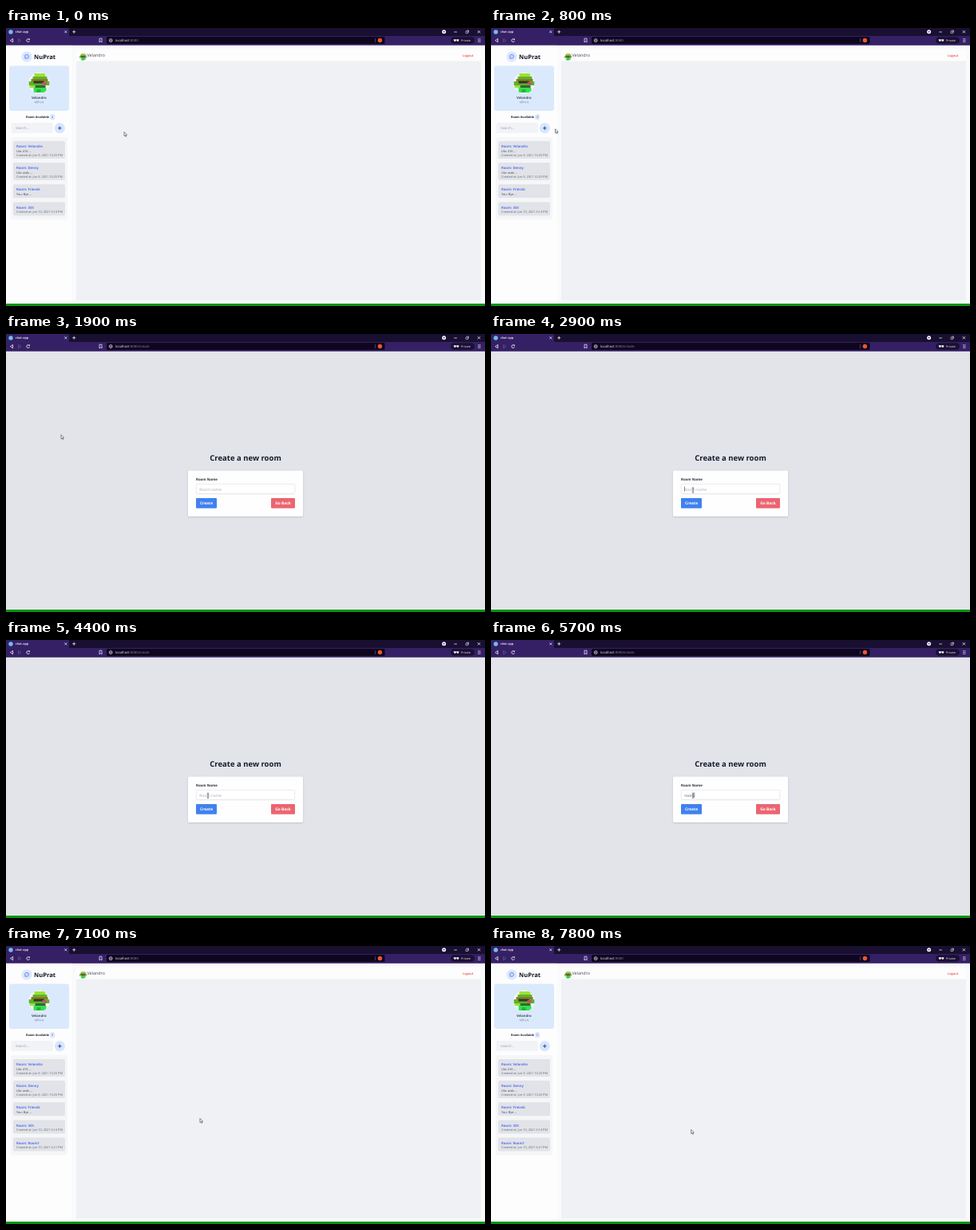
Recreate the animation shown at these times as an HTML page with a canvas. Size 600 by 349 pixels, loop 8000 ms.

```html
<!DOCTYPE html>
<html lang="en">
<head>
<meta charset="utf-8">
<title>chat-app</title>
<style>
html, body { margin: 0; width: 100%; height: 100%; overflow: hidden; background: #f9fafb; }
canvas { display: block; width: 600px; height: 349px; }
</style>
</head>
<body>
<canvas id="stage"></canvas>
<script>
const W = 600, H = 349, LOOP = 8000, STEP = 100;
const canvas = document.getElementById('stage');
const ratio = window.devicePixelRatio || 1;
canvas.width = W * ratio;
canvas.height = H * ratio;
const ctx = canvas.getContext('2d');
const FAMILY = '"Open Sans", "Noto Sans", sans-serif';
const USER = 'Velandro';

// Times of the main events, in ms
const PLUS_CLICK = 1500, URL_CHANGE = 1800, FORM_OPEN = 1900;
const FOCUS = 2900, SUBMIT = 6800, FORM_CLOSE = 7100;
const KEYS = [4800, 5100, 5300, 5500, 5800];
const VALUE = 'room1';

// Pointer stops: time, x, y
const PATH = [
  [200, 148, 130.5], [1000, 68, 126], [1800, 68, 126], [1900, 69, 126.5],
  [2600, 250, 196], [2900, 253, 196], [3100, 253, 195.3], [6100, 253, 195.3],
  [6600, 252.3, 211], [7000, 252.3, 211], [7100, 243, 216.5],
  [7300, 248, 225], [7600, 248, 225], [7800, 250.7, 230.5]
];

const ROOMS = [
  { y: 142, h: 22, name: USER, lines: ['Ula: 416 ...', 'Created at: Jun 9, 2021 10:25 PM'] },
  { y: 169, h: 22, name: 'Denny', lines: ['Ula: asds ...', 'Created at: Jun 9, 2021 10:25 PM'] },
  { y: 196.3, h: 17, name: 'Friends', lines: ['You: Bye ...'] },
  { y: 218.5, h: 17, name: '333', lines: ['Created at: Jun 10, 2021 6:14 PM'] },
  { y: 240.5, h: 17, name: 'Room1', lines: ['Created at: Jun 10, 2021 6:21 PM'] }
];

function rect(x, y, w, h, color) {
  ctx.fillStyle = color;
  ctx.fillRect(x, y, w, h);
}

function box(x, y, w, h, r, fill, stroke, line = 0.6) {
  ctx.beginPath();
  ctx.roundRect(x, y, w, h, r);
  if (fill) { ctx.fillStyle = fill; ctx.fill(); }
  if (stroke) { ctx.strokeStyle = stroke; ctx.lineWidth = line; ctx.stroke(); }
}

function disc(x, y, r, color) {
  ctx.fillStyle = color;
  ctx.beginPath();
  ctx.arc(x, y, r, 0, Math.PI * 2);
  ctx.fill();
}

function ring(x, y, r, color, from = 0, to = Math.PI * 2) {
  ctx.strokeStyle = color;
  ctx.lineWidth = 0.8;
  ctx.beginPath();
  ctx.arc(x, y, r, from, to);
  ctx.stroke();
}

function path(points, { stroke, fill, width = 0.8, close = false }) {
  ctx.beginPath();
  points.forEach(([x, y], i) => i ? ctx.lineTo(x, y) : ctx.moveTo(x, y));
  if (close) ctx.closePath();
  if (fill) { ctx.fillStyle = fill; ctx.fill(); }
  if (stroke) { ctx.strokeStyle = stroke; ctx.lineWidth = width; ctx.stroke(); }
}

function cross(x, y, r, color) {
  path([[x - r, y - r], [x + r, y + r]], { stroke: color });
  path([[x - r, y + r], [x + r, y - r]], { stroke: color });
}

function plus(x, y, r, color, width) {
  path([[x - r, y], [x + r, y]], { stroke: color, width });
  path([[x, y - r], [x, y + r]], { stroke: color, width });
}

function text(str, x, y, size, color, weight = 400, align = 'left') {
  ctx.font = `${weight} ${size}px ${FAMILY}`;
  ctx.fillStyle = color;
  ctx.textAlign = align;
  ctx.fillText(str, x, y);
  return ctx.measureText(str).width;
}

function drawBrowser(onCreate) {
  rect(0, 0, W, 10, '#190f31');
  rect(0, 0, 79, 10, '#352065');
  rect(0, 10, W, 11.6, '#352065');

  disc(6, 5, 2.7, '#72bdec');
  text('chat-app', 11.7, 6.4, 3.9, '#f4f1fb', 600);
  cross(74.8, 4.8, 1.4, '#e8e4f4');
  plus(85.2, 4.8, 2, '#f4f1fb', 0.8);

  disc(548.6, 4.8, 2.5, '#f4f1fb');
  path([[547.4, 4.2], [549.8, 4.2], [548.6, 5.8]], { fill: '#190f31', close: true });
  path([[561.3, 5], [564.9, 5]], { stroke: '#e8e4f4' });
  box(576, 4, 2.6, 2.6, 0, null, '#e8e4f4');
  path([[577, 3.1], [579.5, 3.1], [579.5, 5.6]], { stroke: '#e8e4f4', width: 0.6 });
  cross(592.4, 4.8, 1.6, '#f4f1fb');

  path([[8.6, 13.4], [5.4, 15.6], [8.6, 17.8]], { stroke: '#f4f1fb', close: true });
  path([[15.6, 13.4], [18.8, 15.6], [15.6, 17.8]], { stroke: '#66558e', close: true });
  ring(27.7, 15.6, 1.9, '#f4f1fb', 0.3, 5.5);
  path([[29.8, 13.1], [29.8, 15], [27.9, 15]], { fill: '#f4f1fb', close: true });
  path([[117, 13.2], [120, 13.2], [120, 18], [118.5, 16.6], [117, 18]], { stroke: '#e8e4f4', close: true });

  box(126, 11, 348.5, 9, 1.5, '#0e061f');
  ring(131.2, 15.6, 2, '#c9c4d6');
  path([[129.2, 15.6], [133.2, 15.6]], { stroke: '#c9c4d6', width: 0.5 });
  path([[131.2, 13.6], [131.2, 17.6]], { stroke: '#c9c4d6', width: 0.5 });
  const w = text('localhost', 137, 17.1, 4.25, '#f4f1fb');
  text(':8080' + (onCreate ? '/create' : ''), 137 + w, 17.1, 4.25, '#8d8799');
  rect(462, 13, 0.6, 5, '#6b6478');
  disc(468.4, 15.5, 2.7, '#f2562e');

  box(557, 11.2, 30, 8.6, 4.3, '#1b1033');
  path([[560.5, 14.8], [567.5, 14.8]], { stroke: '#f4f1fb', width: 0.7 });
  disc(562.4, 15.6, 1.3, '#f4f1fb');
  disc(565.8, 15.6, 1.3, '#f4f1fb');
  text('Private', 570, 17, 3.7, '#f4f1fb');
  for (const y of [13.8, 15.6, 17.4]) path([[591, y], [594.6, y]], { stroke: '#d9d3ea', width: 0.7 });
}

function drawAvatar(x, y, k) {
  ctx.save();
  ctx.translate(x, y);
  ctx.scale(k, k);
  ctx.beginPath();
  ctx.arc(0, 0, 13.2, 0, Math.PI * 2);
  ctx.clip();
  rect(-14, -14, 28, 28, '#f7f8f6');
  rect(-6, -12, 14, 4, '#9be431');
  rect(-8, -8, 18, 3, '#62b32b');
  rect(-10, -5, 21, 4, '#8a7a2c');
  rect(-13, -2, 26, 5, '#63ad2c');
  rect(-7, -2.5, 13, 3, '#2a3a1c');
  rect(4, -1, 5, 3, '#d3447a');
  rect(-12, 3, 7, 3, '#8ee635');
  rect(-5, 3, 13, 3, '#2d6b31');
  rect(-7, 6, 16, 6, '#36df4f');
  rect(-3, 8, 5, 4, '#20b53f');
  ctx.restore();
}

function drawRoom({ y, h, name, lines }) {
  box(9, y, 65, h, 2, '#e1e3e8');
  text('Room: ' + name, 13, y + 8, 4.3, '#3a5cf0', 600);
  lines.forEach((line, i) => {
    text(line, 13, y + 13.5 + i * 5.2, 3.85, line.startsWith('Created') ? '#5f646e' : '#3c424d');
  });
}

function drawChat(focused, rooms) {
  rect(0, 21.6, W, 325, '#f9fafb');
  rect(0, 21.6, 82.5, 325, '#fdfdfe');

  disc(26, 36, 6.6, '#dbe8fd');
  ring(26, 35.8, 2.5, '#5a72dc');
  path([[24, 37.2], [23.4, 38.6], [25.2, 38.2]], { fill: '#5a72dc', close: true });
  for (const dx of [-1, 0, 1]) disc(26 + dx, 35.8, 0.35, '#5a72dc');
  text('NuPrat', 35, 39.2, 7.6, '#141a28', 700);

  box(4, 47.5, 75, 56.5, 3, '#dbe9fd');
  drawAvatar(41.5, 69, 1);
  text(USER, 41.3, 89, 4.3, '#272d3b', 600, 'center');
  text('q@q.q', 41.3, 94.4, 3.9, '#7d8797', 400, 'center');

  text('Room Available', 25, 113, 3.76, '#20252f', 700);
  box(55.2, 108, 6, 7.4, 2.5, '#dbe8fd');
  text(String(rooms), 58.2, 113, 3.8, '#56617a', 400, 'center');

  box(6.5, 119, 52.5, 13, 2, '#f2f3f6');
  text('Search...', 12, 127.3, 4.4, '#969ca8');
  disc(67.3, 125.7, 6.6, '#d8e6fd');
  if (focused) box(61, 119.4, 12.8, 12.6, 1, '#dbe8fd', '#15171c', 1);
  plus(67.3, 125.7, 2.3, '#2c4a9c', 1);

  const last = ROOMS[rooms - 1];
  box(6, 137, 71, last.y + last.h + 5 - 137, 3, '#f5f6f8');
  ROOMS.slice(0, rooms).forEach(drawRoom);

  rect(88, 27, 507, 14.5, '#fdfdfe');
  rect(88, 41.5, 507, 300.5, '#eff1f4');
  drawAvatar(96.5, 36.2, 0.36);
  text(USER, 101.5, 36.1, 5.4, '#454a54');
  text('Logout', 572, 36.4, 3.95, '#ee4343', 600);
}

function drawForm(t, pointer) {
  rect(0, 21.6, W, 325, '#e2e4e9');
  text('Create a new room', 300, 159.3, 9.5, '#151a2b', 700, 'center');

  ctx.save();
  ctx.shadowColor = 'rgba(0,0,0,0.16)';
  ctx.shadowBlur = 2.5 * ratio;
  ctx.shadowOffsetY = 0.8 * ratio;
  box(228, 171.5, 144, 57.5, 1.5, '#fefefe');
  ctx.restore();

  text('Room Name', 238, 184.2, 4.4, '#2b303b', 700);
  box(238.3, 188.3, 123.5, 12.2, 1.2, '#ffffff', '#d9dbe0');
  rect(239, 200.7, 122, 0.5, '#e6e7ea');

  const typed = VALUE.slice(0, KEYS.filter(k => t >= k).length);
  const w = text(typed || 'Room name', 242.2, 196.5, 4.9, typed ? '#565b66' : '#a6aab3');
  const lastKey = KEYS.reduce((last, k) => t >= k ? k : last, FOCUS);
  if (t >= FOCUS && t < SUBMIT && (t - lastKey) % 1000 < 500) {
    rect(242.2 + (typed ? w : 0), 191.5, 0.6, 6.2, '#3c414b');
  }

  box(238, 206, 26, 12.7, 1, overCreate(pointer) ? '#2450cf' : '#4081ee');
  text('Create', 251, 214.1, 4.9, '#ffffff', 700, 'center');
  box(332, 206, 30, 12.7, 1, '#eb6571');
  text('Go Back', 347, 214.1, 4.9, '#ffffff', 700, 'center');
}

function inside([x, y], left, top, right, bottom) {
  return x >= left && x <= right && y >= top && y <= bottom;
}

function overCreate(p) {
  return inside(p, 238, 206, 264, 218.7);
}

function pointerAt(t) {
  if (t <= PATH[0][0]) return PATH[0].slice(1);
  for (let i = 1; i < PATH.length; i++) {
    const [t0, x0, y0] = PATH[i - 1], [t1, x1, y1] = PATH[i];
    if (t <= t1) {
      const u = (t - t0) / (t1 - t0), e = u * u * (3 - 2 * u);
      return [x0 + (x1 - x0) * e, y0 + (y1 - y0) * e];
    }
  }
  return PATH[PATH.length - 1].slice(1);
}

function drawPointer(p, onForm) {
  const [x, y] = p;
  const hand = onForm ? overCreate(p) : inside(p, 60.7, 119, 74, 132);
  ctx.save();
  ctx.translate(x, y);
  if (hand) {
    path([[0, 0], [0.9, 0], [1.1, 2.2], [3.6, 2.8], [3.6, 5], [2.8, 6.7], [0, 6.7],
      [-1.8, 4.2], [-1.2, 3.5], [-0.1, 4]], { fill: '#ffffff', stroke: '#2a2d35', width: 0.5, close: true });
  } else if (onForm && inside(p, 238, 188, 362, 200.6)) {
    path([[0, -2.8], [0, 2.8]], { stroke: '#2a2d35', width: 0.7 });
    path([[-1.2, -3], [1.2, -3]], { stroke: '#2a2d35', width: 0.6 });
    path([[-1.2, 3], [1.2, 3]], { stroke: '#2a2d35', width: 0.6 });
  } else {
    path([[0, 0], [0, 5.1], [1.2, 4.1], [2, 5.9], [2.9, 5.5], [2.1, 3.8], [3.6, 3.7]],
      { fill: '#ffffff', stroke: '#343840', width: 0.6, close: true });
  }
  ctx.restore();
}

function draw(time) {
  const t = Math.floor(time / STEP) * STEP;
  const onForm = t >= FORM_OPEN && t < FORM_CLOSE;
  const pointer = pointerAt(t);
  ctx.setTransform(ratio, 0, 0, ratio, 0, 0);
  ctx.textRendering = 'geometricPrecision';
  if (onForm) drawForm(t, pointer);
  else drawChat(t >= PLUS_CLICK && t < FORM_OPEN, t >= FORM_CLOSE ? 5 : 4);
  drawBrowser(t >= URL_CHANGE && t < FORM_CLOSE);
  rect(0, 346, W, 3, '#079310');
  drawPointer(pointer, onForm);
}

const start = performance.now();
function tick() {
  draw((performance.now() - start) % LOOP);
  requestAnimationFrame(tick);
}
tick();
</script>
</body>
</html>
```
